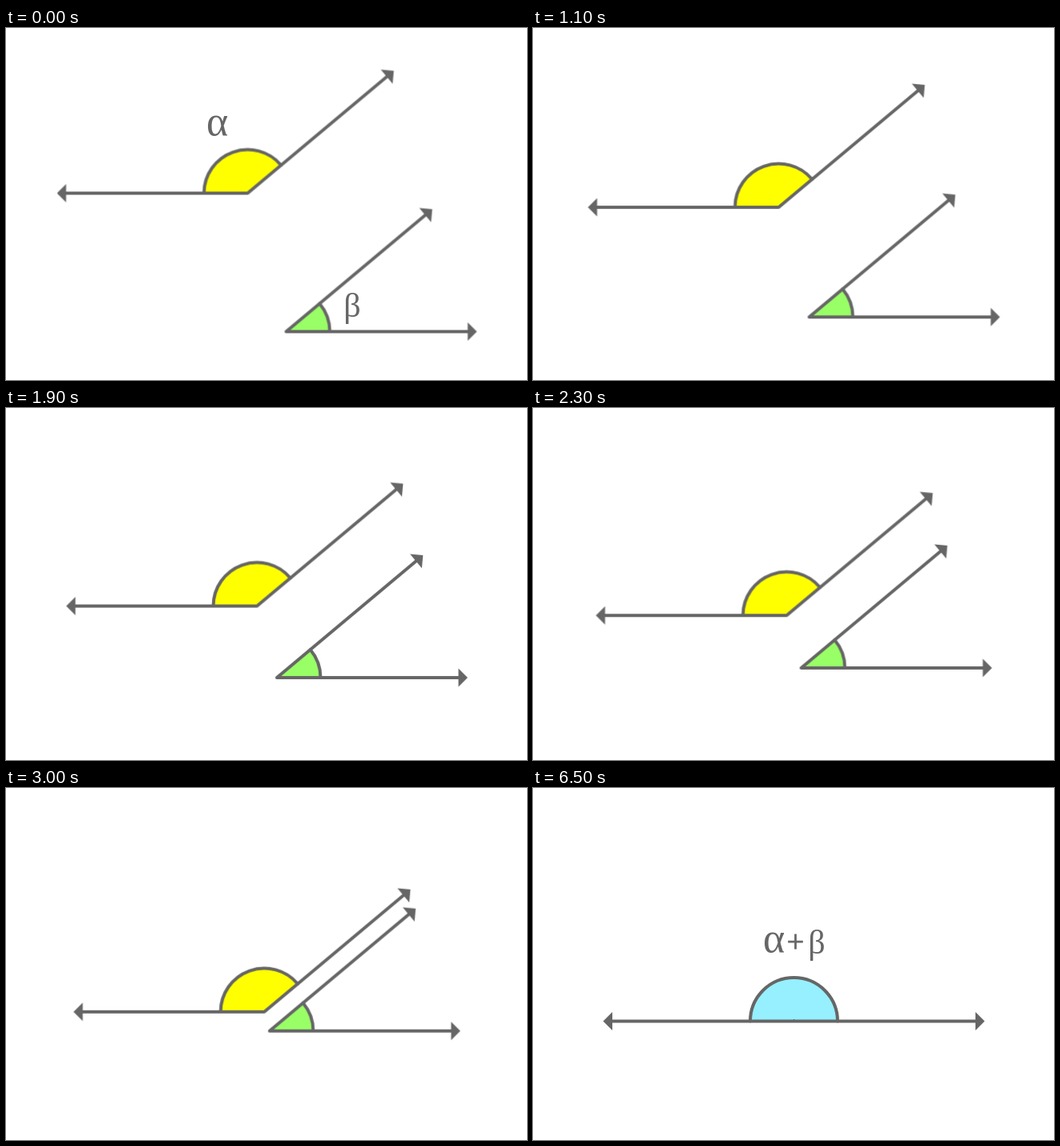
Recreate the animation shown at these times as an HTML page. Size 650x440 px, loop 8 s.

```html
<!DOCTYPE html>
<html lang="en">
<head>
<meta charset="utf-8">
<title>Supplementary angles</title>
<style>
html, body { margin: 0; width: 100%; height: 100%; overflow: hidden; background: #fff; }
svg { display: block; width: 650px; height: 440px; }
.line { fill: none; stroke: #666; stroke-width: 4; stroke-linejoin: round; stroke-linecap: round; }
.head { fill: #666; }
text { font-family: "Liberation Serif", "Times New Roman", serif; font-size: 42px; fill: #666; text-anchor: middle; }
.alpha { font-size: 52px; }
.plus { font-size: 38px; stroke: #666; stroke-width: .8px; }

/* The tiny lead keeps step edges clear of the exact 100 ms marks. */
.anim { animation: 8s -1ms infinite step-end; }
#upper { animation-name: drop; }
#lower { animation-name: rise; }
#start { animation-name: start; }
#joined { animation-name: joined; }
#pair { animation-name: pair; }
#sum { animation-name: sum; }

@keyframes drop {
  0% { transform: translate(301.5px, 206.5px); }
  6.25% { transform: translate(301.5px, 206.5px); animation-timing-function: steps(29, end); }
  42.5%, 100% { transform: translate(325.5px, 291.5px); }
}
@keyframes rise {
  0% { transform: translate(349.5px, 379.5px); }
  6.25% { transform: translate(349.5px, 379.5px); animation-timing-function: steps(29, end); }
  42.5%, 100% { transform: translate(325.5px, 291.5px); }
}
@keyframes start { 0% { visibility: visible; } 6.25%, 100% { visibility: hidden; } }
@keyframes joined { 0% { visibility: hidden; } 43.75% { visibility: visible; } 81.25%, 100% { visibility: hidden; } }
@keyframes pair { 0% { visibility: visible; } 81.25%, 100% { visibility: hidden; } }
@keyframes sum { 0% { visibility: hidden; } 81.25%, 100% { visibility: visible; } }
</style>
</head>
<body>
<svg viewBox="0 0 650 440">
  <defs>
    <path id="head" class="head" d="M238 0 L226.5 -11.5 V11.5 Z"/>
  </defs>

  <g id="pair" class="anim">
    <g id="upper" class="anim">
      <path fill="#ff0" d="M0 0 H-54.5 A54.5 54.5 0 0 1 41.75 -35.03 Z"/>
      <path class="line" stroke-linecap="butt" d="M-54.5 0 A54.5 54.5 0 0 1 41.75 -35.03"/>
      <path class="line" d="M-228 0 H0 L174.66 -146.55"/>
      <use href="#head" transform="rotate(180)"/>
      <use href="#head" transform="rotate(-40)"/>
    </g>
    <g id="lower" class="anim">
      <path fill="#9f6" d="M0 0 H54.5 A54.5 54.5 0 0 0 41.75 -35.03 Z"/>
      <path class="line" d="M54.5 0 A54.5 54.5 0 0 0 41.75 -35.03"/>
      <path class="line" d="M228 0 H0 L174.66 -146.55"/>
      <use href="#head"/>
      <use href="#head" transform="rotate(-40)"/>
    </g>
  </g>

  <g id="start" class="anim">
    <text class="alpha" x="263.5" y="134">α</text>
    <text x="432" y="361">β</text>
  </g>
  <g id="joined" class="anim">
    <text class="alpha" x="287.5" y="218">α</text>
    <text x="408" y="274">β</text>
  </g>

  <g id="sum" class="anim">
    <g transform="translate(325.5 291.5)">
      <path fill="#96f0ff" d="M-54.5 0 A54.5 54.5 0 0 1 54.5 0 Z"/>
      <path class="line" d="M-54.5 0 A54.5 54.5 0 0 1 54.5 0"/>
      <path class="line" d="M-228 0 H228"/>
      <circle class="head" cy="-1.6" r="1"/>
      <use href="#head"/>
      <use href="#head" transform="rotate(180)"/>
    </g>
    <text class="alpha" x="300.5" y="205">α</text>
    <text class="plus" x="327.5" y="205">+</text>
    <text x="354" y="207">β</text>
  </g>
</svg>
</body>
</html>
```
